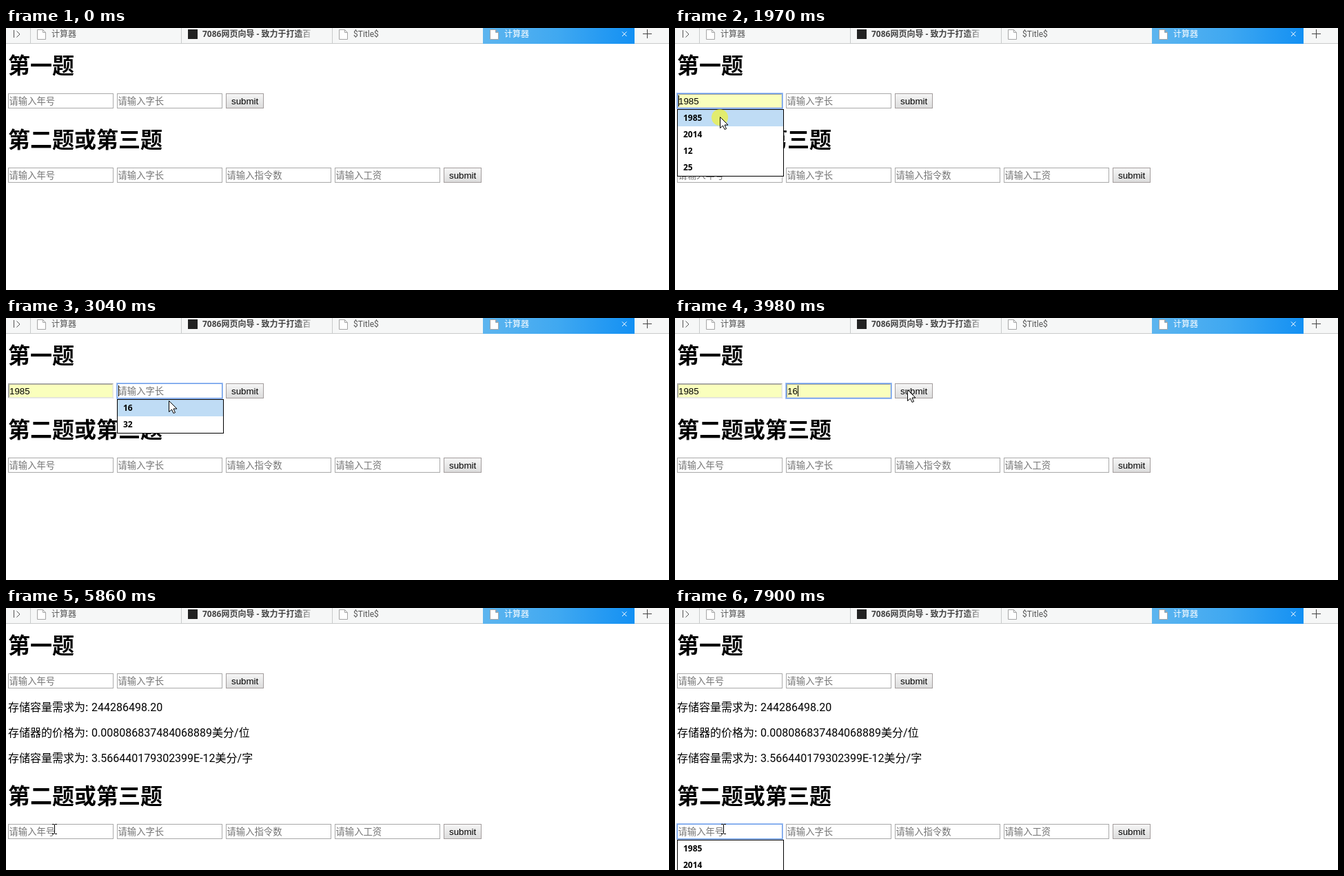
Recreate the animation shown at these times as an HTML page. Size 962 px wide and 381 px high, loop 8000 ms.

```html
<!DOCTYPE html>
<html lang="zh-CN">
<head>
<meta charset="utf-8">
<style>
html, body { margin: 0; width: 100%; height: 100%; overflow: hidden; background: #fff; }
svg { display: block; width: 962px; height: 381px; }
text { white-space: pre; }
.cjk { font-family: "Noto Sans CJK SC", "Noto Sans CJK", sans-serif; }
.ui { font-family: "Liberation Sans", sans-serif; }
.num { font-family: Roboto, "Noto Sans CJK SC", "Noto Sans CJK", sans-serif; }
.list { font-family: "Open Sans", "Noto Sans CJK SC", "Noto Sans CJK", sans-serif; font-weight: bold; }
.head { font-weight: bold; }
</style>
</head>
<body>
<svg viewBox="0 0 962 381">
  <defs>
    <linearGradient id="tab"><stop stop-color="#5db5ef"/><stop offset=".5" stop-color="#3fa8f1"/><stop offset="1" stop-color="#1390f3"/></linearGradient>
    <linearGradient id="fade"><stop stop-color="#f6f7f7" stop-opacity="0"/><stop offset="1" stop-color="#f6f7f7"/></linearGradient>
    <linearGradient id="btn" x2="0" y2="1"><stop stop-color="#f6f6f6"/><stop offset="1" stop-color="#dcdcdc"/></linearGradient>
  </defs>
  <g id="bar"></g>
  <g id="page"></g>
</svg>
<script>
const LOOP = 8000, PITCH = 158, SHIFT = 111, LOADED = 4370;
const FIELDS = ["请输入年号", "请输入字长", "请输入指令数", "请输入工资"];
const YEARS = ["1985", "2014", "12", "25"], WORDS = ["16", "32"];
const RESULTS = [
  ["存储容量需求为:", "244286498.20"],
  ["存储器的价格为:", "0.008086837484068889美分/位"],
  ["存储容量需求为:", "3.566440179302399E-12美分/字"]
];

// Pointer moves: first step, last step, number of steps, end x, end y, shape
const START = [577, 347];
const MOVES = [
  [340, 880, 8, 61, 65, "arrow"],
  [950, 1030, 2, 72, 101, "beam"],
  [1570, 1740, 3, 65, 129, "arrow"],
  [2120, 2500, 6, 240, 104, "beam"],
  [3040, 3040, 1, 236, 120, "arrow"],
  [3120, 3120, 1, 236, 135, "arrow"],
  [3590, 3980, 6, 337, 104, "arrow"],
  [5160, 5630, 7, 68, 319, "arrow"],
  [5780, 5860, 2, 70, 321, "beam"]
];

// Click marks: from, to, centre
const CLICKS = [
  [1190, 1340, 70, 100], [1970, 2120, 65, 130], [2650, 2740, 240, 104],
  [3430, 3590, 236, 135], [4050, 4220, 337, 103],
  [6260, 6330, 71, 321], [7190, 7350, 71, 321]
];

const within = (t, a, b) => t >= a && t < b;
const rect = (x, y, w, h, fill, more = "") =>
  `<rect x="${x}" y="${y}" width="${w}" height="${h}" fill="${fill}" ${more}/>`;
const frame = (x, y, w, h, fill, line) =>
  rect(x + .5, y + .5, w - 1, h - 1, fill, `stroke="${line}"`);
const path = (d, line, more = 'fill="none"') => `<path d="${d}" stroke="${line}" ${more}/>`;
const text = (x, y, size, s, fill = "#000", cls = "cjk") =>
  `<text x="${x}" y="${y}" font-size="${size}" fill="${fill}" class="${cls}">${s}</text>`;

function docIcon(x) {
  return path(`M${x + .5} 2.5h8l4 4v10h-12zM${x + 8.5} 2.5v4h4`, "#a5a5a5", 'fill="#fff"');
}

function tabBar() {
  const line = "#c9cbcb";
  return rect(0, 0, 962, 22, "#f6f7f7") + rect(0, 22, 962, 1, line) +
    [35, 254, 473].map(x => rect(x, 0, 1, 22, line)).join("") +
    path("M11.5 3v11M15.5 4.5l4.5 4.5l-4.5 4.5", "#555") +
    docIcon(45) + text(66, 13, 12, "计算器", "#555") +
    rect(264, 2, 14, 14, "#222") +
    text(285, 13, 12, "7086网页向导 - 致力于打造百", "#444", "list") +
    rect(424, 0, 24, 21, "url(#fade)") +
    docIcon(483) + text(504, 13, 12, "$Title$", "#555", "num") +
    rect(692, 0, 220, 23, "url(#tab)") +
    docIcon(702) + text(723, 13, 12, "计算器", "#fff") +
    path("M894 5.5l6.5 6.5m0-6.5l-6.5 6.5", "#fff") +
    path("M924 8.5h13M930.5 2v13", "#444");
}

function field(i, y, { value = "", focus = false, caret = -1 } = {}) {
  const x = 3 + i * PITCH;
  let s = frame(x, y, 153, 22, value ? "#faffbd" : "#fff", "#a9a9a9");
  if (value) {
    s += path(`M${x + 1} ${y + 20.5}h151v-19`, "#e3e3d8") +
      path(`M${x} ${y + 21.5}h152.5v-21`, "#e8e8e8") +
      path(`M${x + 1.5} ${y + 20}v-18.5h150`, "#a9a99a");
  }
  if (focus) s += frame(x - 1, y - 1, 155, 24, "none", "#a9c6f4") + frame(x, y, 153, 22, "none", "#6a9bea");
  s += value ? text(x + 2, y + 16, 13.333, value, "#000", "ui")
             : text(x + 1.5, y + 16, 13.333, FIELDS[i], "#757575");
  if (caret >= 0) s += rect(x + 2 + caret, y + 3, 1, 16, "#000");
  return s;
}

function button(x, y) {
  return frame(x, y, 55, 22, "url(#btn)", "#a39d9d") + text(x + 8, y + 16, 13.333, "submit", "#000", "ui");
}

function dropdown(x, y, items, active) {
  return frame(x, y, 155, items.length * 24 + 2, "#fff", "#000") +
    items.map((s, i) => (i === 0 && active ? rect(x + 1, y + 1, 153, 24, "#bfdcf5") : "") +
      text(x + 9, y + 17 + i * 24, 12, s, "#000", "list")).join("");
}

function pointer(t) {
  if (t < MOVES[0][0]) return "";
  let [x, y] = START, shape;
  for (const [a, b, n, toX, toY, kind] of MOVES) {
    if (t < a) break;
    const step = b > a ? Math.min(n, 1 + Math.floor((t - a) / (b - a) * (n - 1) + 1e-6)) : n;
    const u = step / n, e = u * u * (3 - 2 * u);
    x += (toX - x) * e;
    y += (toY - y) * e;
    shape = kind;
    if (step < n) break;
  }
  x = Math.round(x);
  y = Math.round(y);
  return shape === "beam"
    ? path(`M${x - 3} ${y - 6.5}h3m1 0h3M${x + .5} ${y - 6}v13M${x - 3} ${y + 7.5}h3m1 0h3`, "#000")
    : path(`M${x + .5} ${y + .5}v16l4-3.5l2.5 5.5l2.5-1l-2.5-5.5h5z`, "#000", 'fill="#fff"');
}

function page(t) {
  const done = t >= LOADED, y2 = 203 + (done ? SHIFT : 0);
  const yearFocus = within(t, 1340, 2740), wordFocus = within(t, 2740, LOADED);
  const year = !done && t >= 1740 ? "1985" : "";
  const word = !done && t >= 3120 ? "16" : "";
  const lastFocus = t >= 6260;
  const lastCaret = within(t, 6260, 6790) || within(t, 7190, 7900);

  let s = text(3, 66, 32, "第一题", "#000", "cjk head") +
    field(0, 95, { value: year, focus: yearFocus, caret: yearFocus ? (t < 2050 ? 0 : 30) : -1 }) +
    field(1, 95, { value: word, focus: wordFocus, caret: wordFocus ? (t < 3510 ? 0 : 15) : -1 }) +
    button(319, 95);
  if (done) {
    s += RESULTS.map(([label, value], i) =>
      text(3, 150 + i * 37, 16, label) + text(124, 150 + i * 37, 16, value, "#000", "num")).join("");
  }
  s += text(3, y2 - 29, 32, "第二题或第三题", "#000", "cjk head") +
    FIELDS.map((_, i) => field(i, y2, i ? {} : { focus: lastFocus, caret: lastCaret ? 0 : -1 })).join("") +
    button(635, y2);

  if (within(t, 1430, 2050)) s += dropdown(3, 118, YEARS, t >= 1650);
  if (within(t, 2740, 3510)) s += dropdown(161, 118, WORDS, t >= 3040);
  if (within(t, 6330, 6560) || t >= 7350) s += dropdown(3, 337, YEARS, false);

  for (const [a, b, x, y] of CLICKS) {
    if (within(t, a, b)) s += `<circle cx="${x}" cy="${y}" r="12" fill="#fffa00" fill-opacity=".55"/>`;
  }
  return s + pointer(t);
}

const bar = document.getElementById("bar"), view = document.getElementById("page");
bar.innerHTML = tabBar();
let last = "", begin;
function draw(now) {
  begin ??= now;
  const next = page((now - begin) % LOOP);
  if (next !== last) view.innerHTML = last = next;
  requestAnimationFrame(draw);
}
requestAnimationFrame(draw);
</script>
</body>
</html>
```
